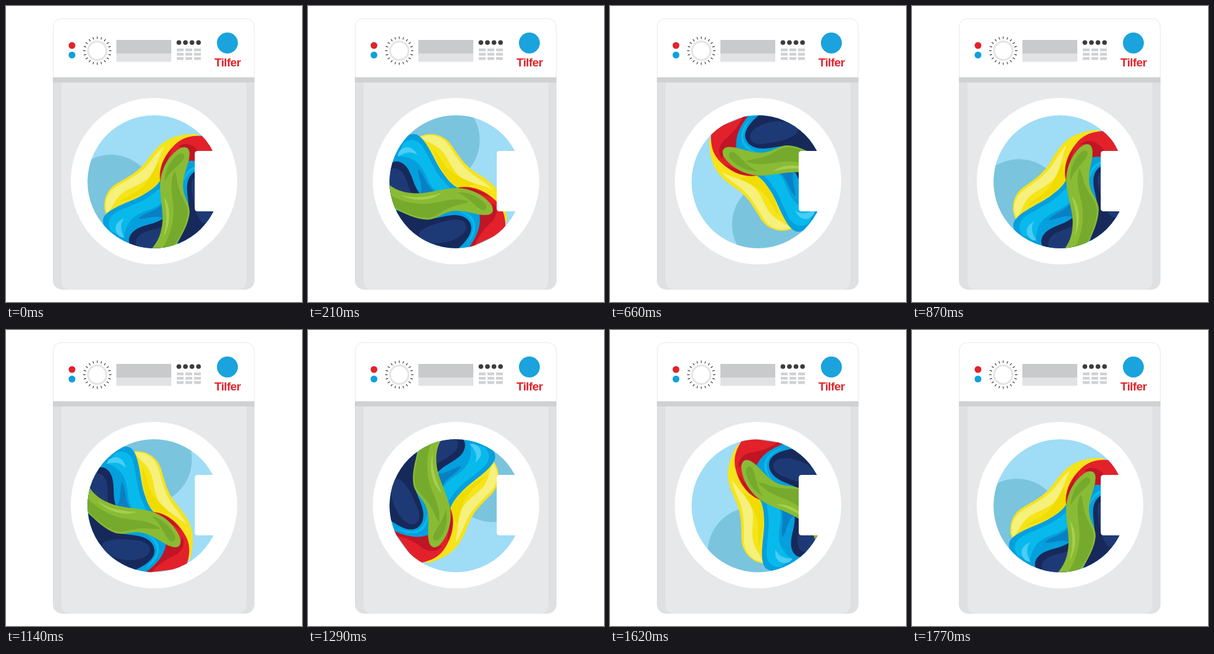
Write an HTML page that moves like this. It is 480x480 px and loops after 1800 ms.

```html
<!DOCTYPE html>
<html lang="en">
<head>
<meta charset="utf-8">
<title>Washing machine</title>
<style>
  html, body { margin: 0; width: 100%; height: 100%; overflow: hidden; background: #fff; }
  svg { display: block; width: 100vw; height: 100vh; }
  text { font: bold 19px "Liberation Sans", Arial, sans-serif; letter-spacing: -.6px; }
</style>
</head>
<body>
<svg viewBox="0 0 480 480">
  <defs>
    <clipPath id="window"><circle cx="240" cy="285" r="107.7"/></clipPath>
    <clipPath id="body"><rect x="76" y="20" width="327" height="440" rx="15"/></clipPath>
  </defs>

  <g clip-path="url(#body)">
    <rect x="76" y="20" width="327" height="440" fill="#dfe0e2"/>
    <path d="M90 120H390V444Q390 460 374 460H106Q90 460 90 444Z" fill="#e7e8ea"/>
    <rect x="76" y="20" width="327" height="96" fill="#fff"/>
    <rect x="76" y="115.500" width="327" height="8.500" fill="#d0d1d3"/>
  </g>
  <path d="M76.500 116V35Q76.500 20.500 91 20.500H388Q402.500 20.500 402.500 35V116" fill="none" stroke="#e4e4e4" stroke-width=".8"/>

  <circle cx="107" cy="64" r="5.500" fill="#e0242b"/>
  <circle cx="107" cy="79.500" r="5.500" fill="#0da2dc"/>
  <g id="ticks" stroke="#3c3c3e" stroke-width="1.200"/>
  <circle cx="148" cy="72.500" r="15" fill="#fff" stroke="#e3e4e5" stroke-width="3"/>
  <rect x="179" y="55" width="89" height="22" fill="#c9cacc"/>
  <rect x="179" y="77" width="89" height="13.500" fill="#e1e2e3"/>
  <g id="buttons"/>
  <circle cx="359" cy="60" r="17" fill="#1aa3dc"/>
  <text x="338" y="98" fill="#e0232b">Tilfer</text>

  <circle cx="240" cy="284" r="135" fill="#fff"/>
  <g clip-path="url(#window)">
    <g id="drum">
      <circle cx="240" cy="285" r="112" fill="#9fdcf6"/>
      <circle cx="228.400" cy="210" r="73" fill="#7bc4de"/>

      <!-- yellow -->
      <path fill="#f5e41a" d="M206 197C226 194 245 206 251 224C257 243 260 262 276 282C294 303 303 318 303 340C303 352 301 362 298 374L270 320L238 300C226 280 222 262 219 240C217 222 212 208 206 197Z"/>
      <path fill="#f6f07c" d="M209 199C227 197 241 207 247 224C253 244 256 263 270 283C280 296 288 305 292 315C276 300 256 292 247 276C238 258 241 238 229 222C223 214 214 208 209 199Z"/>
      <path fill="#f0dc00" d="M221 222C228 232 228 256 240 270C246 279 258 288 268 299C256 296 246 298 238 294C228 278 224 262 222 246Z"/>

      <!-- red -->
      <path fill="#e3212a" d="M236 295C258 295 278 311 289 330C299 346 300 362 291 386L224 394C243 380 256 366 258 348Z"/>
      <path fill="#c01526" d="M258 348C274 354 284 348 286 335C292 350 284 362 268 368C256 374 244 382 234 396H222C243 380 256 366 258 348Z"/>
      <path fill="#c01526" d="M240 297C258 298 274 310 284 326C270 314 258 306 240 301Z"/>

      <!-- blue -->
      <path fill="#049fdd" d="M138 234C156 204 178 189 194 189C202 189 206 194 209 200C218 218 217 246 226 270C230 283 235 291 242 298L260 340C260 362 246 380 222 396H150L120 300Z"/>
      <path fill="#08b9ec" d="M178 199C192 194 203 200 207 216C212 238 213 262 222 280L230 298L205 290C196 278 199 262 194 246C190 230 178 222 164 216Z"/>
      <path fill="#49cdf4" d="M166 211C178 201 192 207 194 224C186 214 176 214 163 217Z"/>
      <path fill="#0a80c4" d="M180 284C188 274 184 256 188 246C196 260 192 278 203 291L184 289Z"/>
      <path fill="#08b9ec" d="M228 331C246 338 252 352 246 366C242 376 234 382 224 388C236 376 246 366 244 354C242 344 236 338 228 331Z"/>

      <!-- navy -->
      <path fill="#17295a" d="M136 240C146 215 164 220 171 236C178 254 170 274 183 294L120 290Z"/>
      <path fill="#1e3a76" d="M130 246C142 226 158 230 163 246C167 262 162 276 168 286L130 278Z"/>
      <path fill="#17295a" d="M120 288L165 322C185 334 205 330 222 336C238 342 243 354 240 364C235 378 216 386 200 394H140Z"/>
      <path fill="#1e3a76" d="M158 345C172 336 200 340 217 342C235 346 238 359 227 367C212 376 182 375 167 364C158 357 152 350 158 345Z"/>

      <!-- green -->
      <path fill="#8abb34" d="M132 250C142 268 156 277 174 283C196 290 222 288 243 297C260 304 274 318 281 334C286 346 282 354 271 352C252 347 240 331 216 328C200 327 190 333 177 329C160 323 144 308 127 290Z"/>
      <path fill="#76aa2d" d="M130 270C146 288 164 298 184 304C206 310 230 306 250 322C240 324 228 320 216 322C200 323 190 330 177 326C160 320 144 305 127 288Z"/>
      <path fill="#76aa2d" d="M236 302C254 306 268 320 274 334C276 342 270 346 264 340C254 328 250 312 236 302Z"/>
      <path fill="#a7cf4d" d="M148 277C166 290 188 294 212 295C194 302 166 296 148 277Z"/>
    </g>
  </g>
  <path d="M352 235H311Q306 235 306 240V328Q306 333 311 333H352Z" fill="#fff"/>
</svg>
<script>
  const STEP = 30, STEPS = 60, TURNS = 2;
  const DRAWN_AT = 38; // the step whose pose the laundry paths show
  const byId = id => document.getElementById(id);

  function add(parent, tag, attrs) {
    const node = document.createElementNS("http://www.w3.org/2000/svg", tag);
    for (const key in attrs) node.setAttribute(key, attrs[key]);
    parent.append(node);
  }

  for (let i = 0; i < 20; i++) {
    add(byId("ticks"), "line", {
      x1: 148, x2: 148, y1: 49.5, y2: 53.5,
      transform: `rotate(${i * 18} 148 72.5)`
    });
  }
  for (let i = 0; i < 4; i++) {
    add(byId("buttons"), "circle", { cx: 280.4 + i * 10.6, cy: 59.3, r: 3.8, fill: "#3c3c3e" });
  }
  for (let i = 0; i < 9; i++) {
    add(byId("buttons"), "rect", {
      x: 277 + (i % 3) * 14, y: 69 + Math.floor(i / 3) * 7,
      width: 11, height: 4.5, fill: "#d0d1d3"
    });
  }

  // The last step completes the second turn, so the pose holds across the loop.
  function draw(time) {
    const step = Math.floor(time / STEP) % STEPS;
    const angle = 360 * TURNS * (step - DRAWN_AT) / (STEPS - 1);
    byId("drum").setAttribute("transform", `rotate(${angle} 240 285)`);
  }

  const start = performance.now();
  function tick() {
    draw(performance.now() - start);
    requestAnimationFrame(tick);
  }
  draw(0);
  requestAnimationFrame(tick);
</script>
</body>
</html>
```
